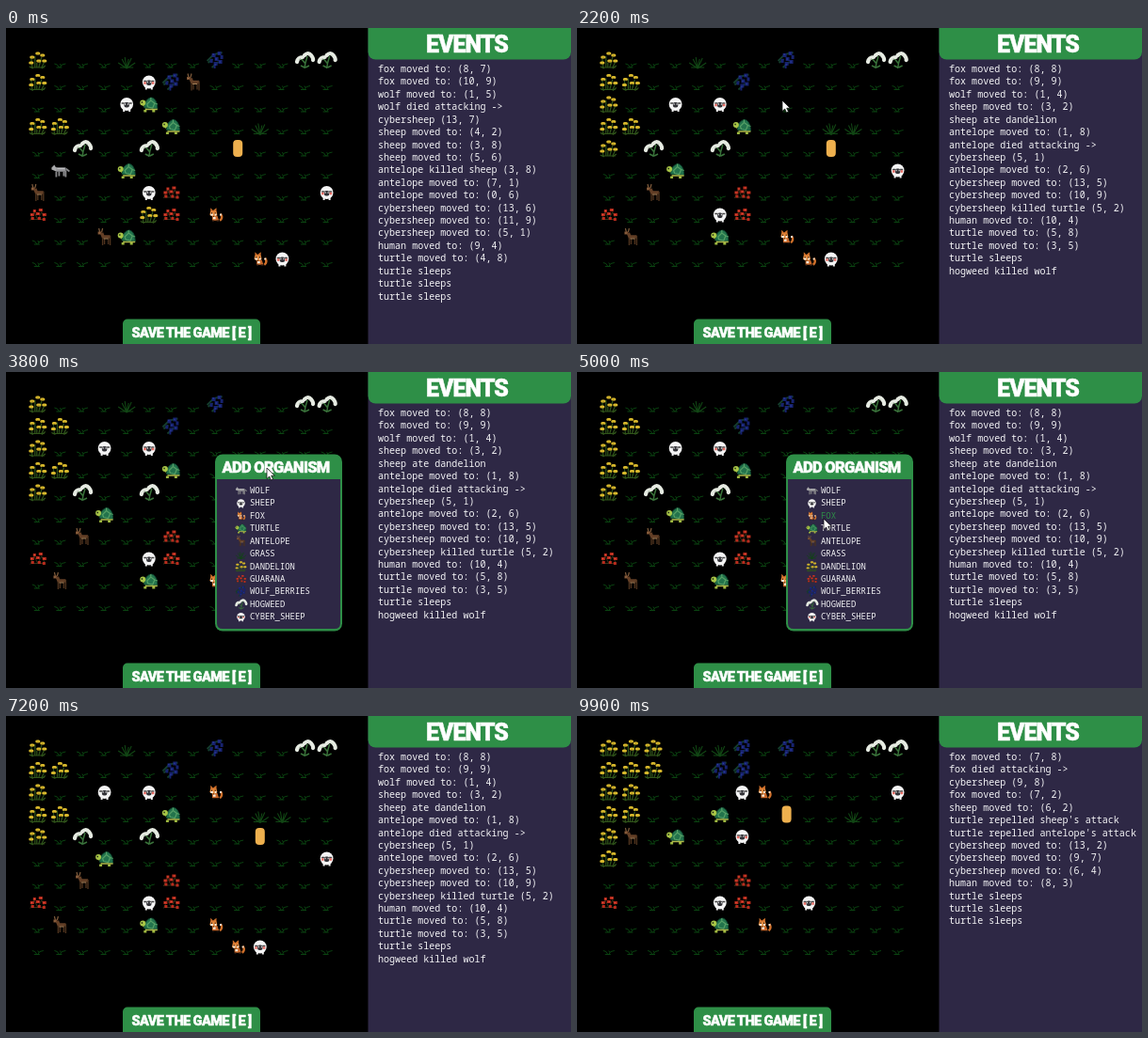
These frames come from a looping animation (600 px wide and 336 px high, 10000 ms). An HTML page:

```html
<!DOCTYPE html>
<html lang="en">
<meta charset="utf-8">
<title>Organism simulator</title>
<style>
  html, body { margin: 0; width: 100%; height: 100%; overflow: hidden; background: #000 }
  svg { display: block; width: 600px; height: 336px }
  path { fill: none }
  text { fill: #f4f4f6; font-family: "Noto Sans Mono", "DejaVu Sans Mono", monospace; white-space: pre }
  .title { fill: #fff; stroke: #fff; stroke-width: .5; font-family: Roboto, sans-serif;
    font-weight: 900; letter-spacing: -.04em; text-anchor: middle }
  #log { font-size: 10.05px }
  #items { font-size: 8.9px }
  .hover { fill: #2e8f47 }
  .green { fill: #2e8f47 }
  .panel { fill: #2e2845 }
</style>
<svg viewBox="0 0 600 336">
  <defs>
    <g id="tuft"><path d="M-6 4l3 1l2 3M0 8l2-3l4-1M-4 8h6M1 6l-1-2" stroke="#0c4a12" stroke-width=".9"/></g>
    <g id="grass"><path d="M0 9L-9 3M0 9L-5-1M0 9L-2-3M0 9L2-1M0 9L5-2M0 9L9 3M-7 8h14" stroke="#114614" stroke-width="1.100"/></g>
    <g id="dandelion">
      <path d="M-6 8L-7-2M-3 8V-4M1 8L4-3M4 8L7 2M-1 8V3M-9 7l4 2M8 6l-4 3M-8 8H7" stroke="#30551a" stroke-width="1.200"/>
      <path d="M-7-3h2M-1-7h2M4-5h2M-8 3h2M0 1h2M6 1h2" stroke="#d8b82c" stroke-width="3.200" stroke-linecap="round"/>
      <path d="M-7-2h2M-1-6h2M4-4h2M0 2h2" stroke="#98821c"/>
    </g>
    <g id="berries">
      <path d="M-9 1L-2-6L7-8M-8 3L-3-1M-4 8L3 2" stroke="#143d2c" stroke-width="1.800"/>
      <path d="M-4-5h4M2-7h4M5-3h3M-6 1h3M-1-1h4M3 2h4M-2 4h4M-2 7h2" stroke="#17226e" stroke-width="4"/>
      <path d="M-3-6h1M3-7h1M0-1h1M4 2h1M-1 5h1" stroke="#3145a8" stroke-width="1.300"/>
    </g>
    <g id="hogweed">
      <path d="M0 9L1 3L3-4M1 4L-4-2M0 8L-4 6M1 8L5 6" stroke="#39723a" stroke-width="1.500"/>
      <path d="M-8 2Q-7-3-2-3M0-5Q4-9 7-5T9 0" stroke="#e6ebe2" stroke-width="4.200" stroke-linecap="round"/>
      <path d="M-6 0l2-2M4-5l2 1" stroke="#b5c4b0"/>
    </g>
    <g id="guarana">
      <path d="M-8 6L-4-3L0 5L4-3L8 6M-7 5H7" stroke="#35331a"/>
      <path d="M-5-4h3M1-5h4M-8 0h4M-2-1h4M5 0h4M-7 4h3M0 4h3M5 5h3" stroke="#b92b1d" stroke-width="3"/>
      <path d="M-4-4h1M3-5h1M-7 0h1M0-1h1M6 0h1" stroke="#e55c40"/>
    </g>
    <g id="sheep">
      <path d="M-3 4v4M3 4v4" stroke="#eee" stroke-width="2"/>
      <circle r="6.900" fill="#f4f4f4"/>
      <path d="M-5.500-1h3M2.500-1h3" stroke="#444" stroke-width="1.500"/>
      <rect x="-2.700" y="-2" width="5.400" height="5.500" rx="2" fill="#303035"/>
      <path d="M-2 0h1M1 0h1" stroke="#fff" stroke-width="1.300"/>
    </g>
    <g id="cyber">
      <use href="#sheep"/>
      <path d="M-5.500 1h2.500M3 1h2.500" stroke="#e66a62" stroke-width="2.500"/>
    </g>
    <g id="turtle">
      <path d="M-4 6v2.500M5 6v2.500M-6 0l4 4" stroke="#9db83f" stroke-width="3"/>
      <path d="M-5 4C-5-3-1-7 3-7C7-6 9-1 9 5Z" style="fill:#23734c" stroke="#0e4630"/>
      <path d="M-2 0L2-4L6-1L4 4L-1 3ZM2-4V-7M6-1L9 0" stroke="#55a066" stroke-width="1.200"/>
      <path d="M-4 5.500H9" stroke="#b0b84a" stroke-width="1.500"/>
      <circle cx="-6.500" cy="-1.500" r="3" fill="#a8c646"/>
      <path d="M-8-2h1.300" stroke="#111" stroke-width="1.500"/>
    </g>
    <g id="antelope">
      <path d="M-6-9l1 4M-2-9l-1 4" stroke="#7d5b3c" stroke-width="1.200"/>
      <path d="M-7-4h4" stroke="#7a4f31" stroke-width="3"/>
      <path d="M-3-4L-1 1M-2 0H6" stroke="#633f26" stroke-width="3.400"/>
      <path d="M-2 1V9M0 1V8M4 1V8M6-1V9" stroke="#4d321d" stroke-width="1.400"/>
      <path d="M-1 2H4M-6-4h1" stroke="#a17f58"/>
    </g>
    <g id="fox" transform="scale(.9)">
      <path d="M-6-3V-8L-3-5L1-8V-3Z" style="fill:#d0702a"/>
      <path d="M5 7Q9 4 6-1" stroke="#d0702a" stroke-width="2.600"/>
      <path d="M-4 1H2L4 7H-4Z" style="fill:#c9682a"/>
      <path d="M-6-4H1L2 0L-2 3L-7 0Z" style="fill:#e58a3e"/>
      <path d="M-6 0h3M-1 0h2M-3 4h3" stroke="#f4e9d8" stroke-width="2.400"/>
      <path d="M-5-2h1M-1-2h1M-3 2h1M-4 7.500h2M1 7.500h3" stroke="#29180f" stroke-width="1.500"/>
      <path d="M6-1v2" stroke="#f4e9d8" stroke-width="2"/>
    </g>
    <g id="wolf">
      <path d="M-9-3L-6-6L-5-4L-2-2L-4 1L-9-1Z" style="fill:#a9a9ab"/>
      <path d="M-4-1H6" stroke="#969699" stroke-width="4.500"/>
      <path d="M-4 1V7M-1 1V6M4 1V6M6 0V7M6-2L10 1" stroke="#88888a" stroke-width="1.800"/>
      <path d="M-3-2H5" stroke="#c2c2c4"/>
    </g>
    <g id="human"><rect x="-5" y="-9" width="10" height="18" rx="4" fill="#eeb04e"/></g>
  </defs>

  <g id="field"></g>
  <rect class="panel" x="384.500" width="216" height="336"/>
  <rect class="green" x="384.500" y="-10" width="215.500" height="43.500" rx="8"/>
  <text class="title" x="489.500" y="26" font-size="25">EVENTS</text>
  <g id="log"></g>
  <rect class="green" x="124" y="309.500" width="146" height="40" rx="5"/>
  <text class="title" x="197" y="328.500" font-size="14.500">SAVE THE GAME [ E ]</text>

  <g id="menu">
    <rect class="green" x="222" y="87.500" width="135" height="188" rx="8"/>
    <path d="M224 114H355V267Q355 273 349 273H230Q224 273 224 267Z" style="fill:#2e2845"/>
    <text class="title" x="286.500" y="106.500" font-size="16.400">ADD ORGANISM</text>
    <g id="items"></g>
  </g>
  <path id="cursor" d="M0 0V11.500L2.700 9L4.500 13L6.500 12L4.700 8.200H8.300Z" style="fill:#fff" stroke="#000" stroke-width=".7"/>
</svg>
<script>
const $ = s => document.querySelector(s);
const COLS = 14, ROWS = 10, LOOP = 10000, ROW_H = 13.42;
const MENU_OPEN = 2600, MENU_CLOSE = 5500;

// Cells are written as column (base 14) followed by row.
const commonPlants = { grass: '40 b3', berries: '80 61', hogweed: 'c0 d0', guarana: '66 07 67' };
const afterFirst = {
  dandelion: '00 01 11 02 03 13 04', grass: '40 a3 b3', hogweed: 'c0 d0 24 54',
  sheep: '32 57', cyber: '52 d5 a9', turtle: '63 35 58', antelope: '26 18', fox: '88 99', human: 'a4'
};
const firstLog = `fox moved to: (8, 8)
fox moved to: (9, 9)
wolf moved to: (1, 4)
sheep moved to: (3, 2)
sheep ate dandelion
antelope moved to: (1, 8)
antelope died attacking ->
cybersheep (5, 1)
antelope moved to: (2, 6)
cybersheep moved to: (13, 5)
cybersheep moved to: (10, 9)
cybersheep killed turtle (5, 2)
human moved to: (10, 4)
turtle moved to: (5, 8)
turtle moved to: (3, 5)
turtle sleeps
hogweed killed wolf`;

const scenes = [
  { start: 0, cells: {
      dandelion: '00 01 03 13 57', grass: '40 a3', hogweed: 'c0 d0 24 54', sheep: '42 56',
      cyber: '51 d6 b9', turtle: '52 63 45 48', antelope: '71 06 38', fox: '87 a9', wolf: '15', human: '94' },
    log: `fox moved to: (8, 7)
fox moved to: (10, 9)
wolf moved to: (1, 5)
wolf died attacking ->
cybersheep (13, 7)
sheep moved to: (4, 2)
sheep moved to: (3, 8)
sheep moved to: (5, 6)
antelope killed sheep (3, 8)
antelope moved to: (7, 1)
antelope moved to: (0, 6)
cybersheep moved to: (13, 6)
cybersheep moved to: (11, 9)
cybersheep moved to: (5, 1)
human moved to: (9, 4)
turtle moved to: (4, 8)
turtle sleeps
turtle sleeps
turtle sleeps` },
  { start: 1100, cells: afterFirst, log: firstLog },
  { start: MENU_CLOSE, cells: { ...afterFirst, fox: '82 88 99' }, log: firstLog },
  { start: 8000, cells: {
      dandelion: '00 01 11 02 03 13 04', hogweed: 'c0 d0 54', sheep: '42 57',
      cyber: '53 d4 99', turtle: '63 34 58', antelope: '16', fox: '83 78 98', human: 'a3' },
    log: `fox moved to: (7, 8)
fox moved to: (9, 8)
fox moved to: (8, 3)
sheep moved to: (4, 2)
turtle repelled sheep's attack
antelope moved to: (1, 6)
antelope ate hogweed and died
cybersheep moved to: (13, 4)
cybersheep moved to: (9, 9)
cybersheep moved to: (5, 3)
human ate grass
turtle sleeps
turtle moved to: (3, 4)
turtle sleeps` },
  { start: 9200, cells: {
      dandelion: '00 10 01 11 02 12 03 13 04', berries: '80 51 61', sheep: '52 57',
      cyber: '54 d3 98', turtle: '53 34 58', antelope: '14', fox: '73 68 97', human: '93' },
    log: `fox moved to: (6, 8)
fox moved to: (9, 7)
fox moved to: (7, 3)
sheep moved to: (5, 2)
turtle repelled sheep's attack
antelope moved to: (1, 4)
cybersheep moved to: (13, 3)
cybersheep moved to: (9, 8)
cybersheep moved to: (5, 4)
human moved to: (9, 3)
turtle moved to: (5, 3)
turtle sleeps
turtle sleeps` },
  { start: 9700, cells: {
      dandelion: '00 10 20 01 11 21 02 12 03 13 04 05', grass: '40 50 b3', berries: '60 80 51 61',
      sheep: '62 57', cyber: 'd2 64 97', turtle: '53 34 58', antelope: '14', fox: '72 78', human: '83' },
    log: `fox moved to: (7, 8)
fox died attacking ->
cybersheep (9, 8)
fox moved to: (7, 2)
sheep moved to: (6, 2)
turtle repelled sheep's attack
turtle repelled antelope's attack
cybersheep moved to: (13, 2)
cybersheep moved to: (9, 7)
cybersheep moved to: (6, 4)
human moved to: (8, 3)
turtle sleeps
turtle sleeps
turtle sleeps` }
];

// Time, x and y of the pointer tip.
const pointer = [[1600, 150, 180], [2200, 218, 77], [2500, 222, 87], [2900, 222, 87],
  [3700, 277, 102], [4200, 277, 102], [4900, 262, 156], [5500, 262, 156], [6000, 285, 170]];

const use = (id, x, y, scale = 1) =>
  `<use href="#${id}" transform="translate(${x} ${y}) scale(${scale})"/>`;

function drawScene({ cells, log }) {
  const board = {};
  for (const [kind, list] of Object.entries({ ...commonPlants, ...cells }))
    for (const cell of list.split(' ')) board[cell] = kind;
  let field = '';
  for (let row = 0; row < ROWS; row++)
    for (let col = 0; col < COLS; col++)
      field += use(board[col.toString(COLS) + row] || 'tuft', 33.8 + col * 23.6, 34 + row * 23.5);
  $('#field').innerHTML = field;
  $('#log').innerHTML = log.replace(/>/g, '&gt;').split('\n')
    .map((line, i) => `<text x="395" y="${47 + i * ROW_H}">${line}</text>`).join('');
}

const icons = ['wolf', 'sheep', 'fox', 'turtle', 'antelope', 'grass', 'dandelion', 'guarana', 'berries', 'hogweed', 'cyber'];
const names = { berries: 'wolf_berries', cyber: 'cyber_sheep' };
$('#items').innerHTML = icons.map((id, i) => {
  const y = 126 + i * ROW_H;
  return use(id, 249.5, y, .62) + `<text x="259" y="${y + 3}">${(names[id] || id).toUpperCase()}</text>`;
}).join('');
const labels = document.querySelectorAll('#items text');

function pointerAt(t) {
  const i = pointer.findIndex(p => p[0] > t);
  if (i < 1) return null;
  const [t0, x0, y0] = pointer[i - 1], [t1, x1, y1] = pointer[i];
  const p = (t - t0) / (t1 - t0), k = p * p * (3 - 2 * p);
  return [x0 + (x1 - x0) * k, y0 + (y1 - y0) * k];
}

let shown;
function frame() {
  const t = Math.floor(performance.now() % LOOP / 100) * 100;
  const scene = scenes.findLast(s => s.start <= t);
  if (scene !== shown) drawScene(shown = scene);

  const open = t >= MENU_OPEN && t < MENU_CLOSE, tip = pointerAt(t);
  $('#menu').style.display = open ? '' : 'none';
  $('#cursor').style.display = tip ? '' : 'none';
  if (tip) $('#cursor').setAttribute('transform', `translate(${tip})`);
  const hovered = open && tip ? Math.round((tip[1] - 126) / ROW_H) : -1;
  labels.forEach((label, i) => label.classList.toggle('hover', i === hovered));
  requestAnimationFrame(frame);
}
frame();
</script>
</html>
```
